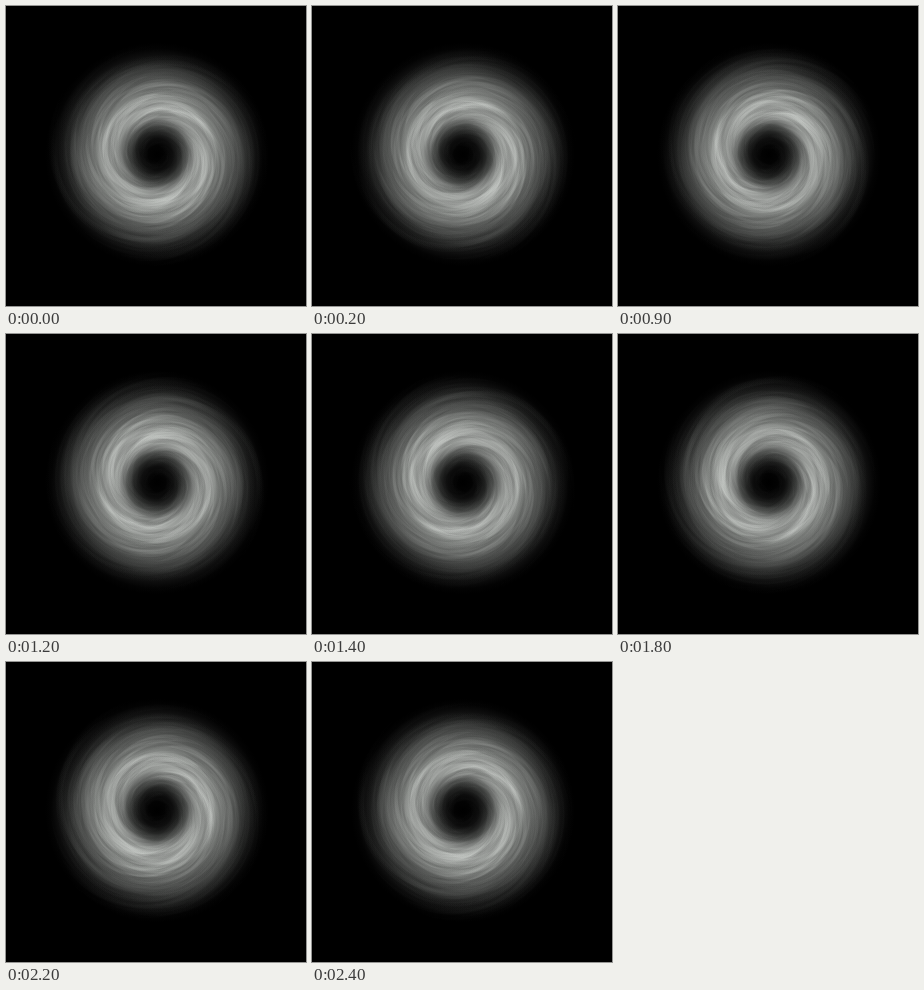
An HTML page with a canvas that plays this animation: 300 px wide and 300 px high, repeating every 2.5 s.

```html
<!DOCTYPE html>
<html lang="en">
<head>
<meta charset="utf-8">
<title>Swirling disc</title>
<style>
  html, body { margin: 0; width: 100%; height: 100%; overflow: hidden; background: #000; }
  canvas { display: block; width: 100vw; height: 100vh; }
</style>
</head>
<body>
<canvas id="stage" width="300" height="300"></canvas>
<script>
const ctx = document.getElementById('stage').getContext('2d');
const LOOP = 2500, STEP = 100, TAU = Math.PI * 2;
const CX = 151, CY = 148.5, RADIUS = 112;

// Brightness of the disc by distance from its centre
const profile = [
  [0, 4], [9, 8], [16, 18], [23, 42], [29, 80], [35, 122], [41, 150], [47, 160],
  [53, 154], [60, 136], [68, 111], [76, 85], [84, 60], [92, 36], [99, 19], [106, 8], [112, 0]
];

let seed = 4711;
function random() {
  seed = (seed * 16807) % 2147483647;
  return seed / 2147483647;
}
const between = (a, b) => a + (b - a) * random();

// Radial shading of the disc, brightened or dimmed as a whole
function shade(gain, offset) {
  const gradient = ctx.createRadialGradient(0, 0, 0, 0, 0, RADIUS);
  for (const [r, v] of profile) {
    const n = Math.round(Math.max(0, Math.min(255, v * gain + offset)));
    gradient.addColorStop(r / RADIUS, `rgb(${n},${Math.round(n * 1.02)},${n})`);
  }
  return gradient;
}

const glow = shade(1, -5);
const light = shade(1.35, 5);
const dark = shade(0.68, 0);

// A curved sliver, pointed at both ends, that drifts outwards along its length
function sliver(r, span, drift, width) {
  const path = new Path2D(), n = 24;
  for (let i = 0; i <= 2 * n; i++) {
    const s = i <= n ? i / n : 2 - i / n;
    const side = i <= n ? 1 : -1;
    const d = r + drift * (s - 0.5) + side * width / 2 * Math.sin(Math.PI * s);
    const a = span * (s - 0.5);
    path.lineTo(d * Math.cos(a), d * Math.sin(a));
  }
  path.closePath();
  return path;
}

function makeStrand() {
  const r = 8 + 95 * Math.pow(random(), 0.75);
  const span = between(0.8, 2.2);
  const pitch = between(2, 15) * Math.min(1, r / 50);
  return {
    path: sliver(r, span, pitch * span, between(2, 7)),
    fill: random() < 0.5 ? light : dark,
    alpha: between(0.06, 0.17),
    start: random() * TAU
  };
}

const strands = Array.from({ length: 640 }, makeStrand);

function draw(phase) {
  ctx.setTransform(1, 0, 0, 1, 0, 0);
  ctx.globalAlpha = 1;
  ctx.fillStyle = '#000';
  ctx.fillRect(0, 0, 300, 300);
  ctx.translate(CX, CY);
  ctx.fillStyle = glow;
  ctx.beginPath();
  ctx.arc(0, 0, RADIUS, 0, TAU);
  ctx.fill();
  for (const s of strands) {
    ctx.save();
    ctx.rotate(s.start - phase * TAU);
    ctx.globalAlpha = s.alpha;
    ctx.fillStyle = s.fill;
    ctx.fill(s.path);
    ctx.restore();
  }
}

let shown = -1;
function tick() {
  const step = Math.floor((performance.now() % LOOP) / STEP);
  if (step !== shown) {
    shown = step;
    draw(step * STEP / LOOP);
  }
  requestAnimationFrame(tick);
}
tick();
</script>
</body>
</html>
```
